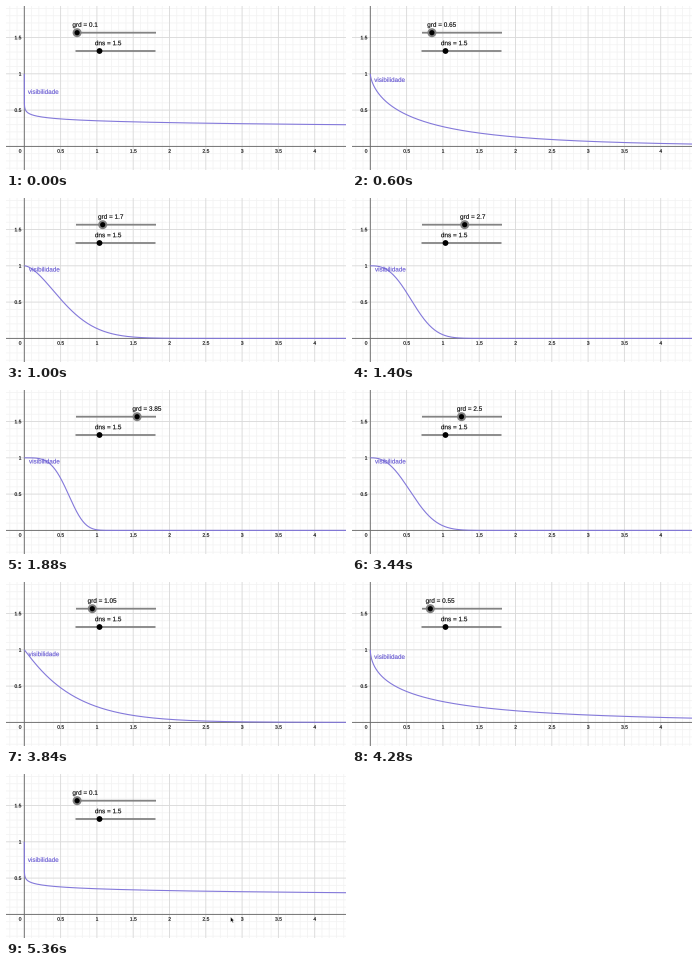
Write a matplotlib script that moves like this. It is 340 by 164 pixels and loops after 5.4 s.

```python
import numpy as np
import matplotlib.pyplot as plt
from matplotlib.animation import FuncAnimation
from matplotlib.patches import Circle, PathPatch, Polygon
from matplotlib.path import Path
from matplotlib.textpath import TextPath

W, H, DPI = 340, 164, 100
STEP, FRAMES = 40, 135
X0, Y0, UNIT = 18.3, 140.4, 72.6
PURPLE, CURVE = "#6557d2", "#8378da"
DNS = 1.5
SLIDER_LEFT, SLIDER_LEN, SLIDER_MAX = 69.5, 80, 5
GRD_Y, DNS_Y = 26.7, 45

plt.rcParams["font.family"] = "Liberation Sans"

fig = plt.figure(figsize=(W / DPI, H / DPI), dpi=DPI, facecolor="white")
ax = fig.add_axes([0, 0, 1, 1])
ax.set_xlim(0, W)
ax.set_ylim(H, 0)
ax.axis("off")


def pt(px):
    return px * 72 / DPI


def line(xs, ys, color, width, z):
    return ax.plot(xs, ys, color=color, lw=pt(width), zorder=z, snap=False,
                   solid_capstyle="butt")[0]


def disc(x, y, r, color, z):
    return ax.add_patch(Circle((x, y), r, fc=color, ec="none", zorder=z, snap=False))


def glyphs(x, y, s, size, align=0):
    """Outline of a text; align is 0 for left, 0.5 for centre, 1 for right."""
    path = TextPath((0, 0), s, size=size)
    shift = align * path.get_extents().x1
    return Path(path.vertices * [1, -1] + [x - shift, y], path.codes)


def text(x, y, s, size=6.4, color="black", align=0):
    return ax.add_patch(PathPatch(glyphs(x, y, s, size, align), fc=color, ec=color,
                                  lw=pt(0.12), zorder=6, snap=False))


def draw_grid():
    for k in range(-3, 46):
        color, width, z = ("#dadada", 0.9, 1) if k % 5 == 0 else ("#f3f3f3", 0.8, 0)
        x, y = X0 + k * UNIT / 10, Y0 - k * UNIT / 10
        line([x, x], [0, H], color, width, z)
        line([0, W], [y, y], color, width, z)
    line([0, W], [Y0, Y0], "#6c6c6c", 0.9, 2)
    line([X0, X0], [0, H], "#6c6c6c", 0.9, 2)


def draw_numbers():
    for k in range(1, 9):
        text(X0 + k * UNIT / 2, 146.7, f"{k / 2:g}", 5, align=0.5)
    for k in range(1, 4):
        text(15.2, Y0 - k * UNIT / 2 + 1.8, f"{k / 2:g}", 5, align=1)
    text(14, 146.7, "0", 5, align=0.5)


def slider_x(value):
    return SLIDER_LEFT + SLIDER_LEN * value / SLIDER_MAX


def draw_track(left, y):
    line([left, left + SLIDER_LEN], [y, y], "#838383", 1.8, 4)


draw_grid()
draw_numbers()
draw_track(SLIDER_LEFT + 0.5, GRD_Y)
draw_track(SLIDER_LEFT, DNS_Y)
disc(slider_x(DNS), DNS_Y, 2.9, "black", 5)
text(slider_x(DNS) - 4.6, 39.2, f"dns = {DNS:g}")

halo = disc(0, GRD_Y, 4.5, "#808080", 4.5)
knob = disc(0, GRD_Y, 2.6, "black", 5)
grd_label = text(0, 0, "grd")
curve = line([], [], CURVE, 1.1, 3)
curve_label = text(0, 0, "visibilidade", 6.3, PURPLE)

ARROW = np.array([(0, 0), (0, 5.2), (1.2, 4.1), (2, 5.9), (2.9, 5.5),
                  (2.1, 3.8), (3.7, 3.7)])
cursor = ax.add_patch(Polygon(ARROW, fc="black", ec="white", lw=pt(0.4), zorder=8))
CURSOR_START, CURSOR_TIP, CURSOR_STEP = 5280, np.array([137, 77]), np.array([43.8, 33])

# Dense samples close to zero keep the steep start of the curve.
XS = np.concatenate([[0], np.geomspace(1e-12, 0.02, 80), np.linspace(0.025, 4.6, 500)])

# Turning points of the drag: times in ms and slider values
DRAG_T = [380, 1000, 1880, 2400, 2680, 3440, 3760, 4280, 4640]
DRAG_V = [0.1, 1.7, 3.85, 4.65, 4.35, 2.5, 1.15, 0.55, 0.1]


def update(i):
    t = i * STEP
    grd = round(np.interp(t, DRAG_T, DRAG_V) * 20) / 20

    x = slider_x(grd)
    halo.center = knob.center = (x, GRD_Y)
    grd_label.set_path(glyphs(x - 4.7, 20.8, f"grd = {grd:g}", 6.4))

    ys = np.exp(-(DNS * XS) ** grd)
    curve.set_data(X0 + XS * UNIT, Y0 - ys * UNIT)
    drop = 19.9 * np.exp(-3.17 * grd)
    curve_label.set_path(glyphs(21.8 + 0.7 * min(grd, 1.7), 73.4 + drop,
                                "visibilidade", 6.3))

    cursor.set_visible(t >= CURSOR_START)
    cursor.set_xy(ARROW + CURSOR_TIP + CURSOR_STEP * (t - CURSOR_START) / STEP)
    return halo, knob, grd_label, curve, curve_label, cursor


anim = FuncAnimation(fig, update, frames=FRAMES, interval=STEP,
                     repeat=True, repeat_delay=0, blit=False)
plt.show()
```
